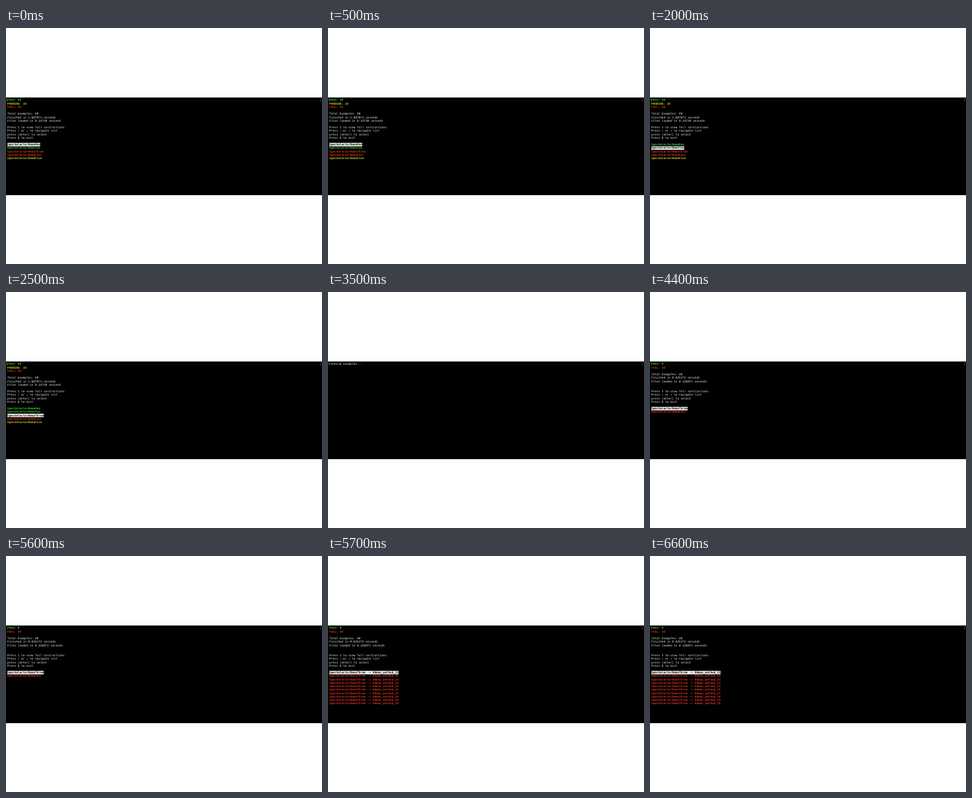
These frames come from a looping animation (480x360 px, 6.8 s). An HTML page:

```html
<!DOCTYPE html>
<html lang="en">
<head>
<meta charset="utf-8">
<title>Spec selector</title>
<style>
  html, body { margin: 0; width: 100%; height: 100%; overflow: hidden; background: #fff; }
  svg { display: block; width: 100vw; height: 100vh; }
  text {
    font-family: "DejaVu Sans Mono", monospace;
    font-size: 43.7px;
    text-rendering: geometricPrecision;
    fill: #f2f2f2;
  }
  .pass, .fail, .pending, .selected { font-weight: bold; }
  .pass { fill: #2fc92c; }
  .fail { fill: #cf3020; }
  .pending { fill: #c8c52b; }
  .italic { font-style: italic; }
  .selected { fill: #000; }
  .mark { fill: none; stroke: #777; stroke-width: 5; }
</style>
</head>
<body>
<svg viewBox="0 0 4800 3600">
  <rect y="1060" width="4800" height="1490"/>
  <path class="mark" id="leftMark" d="M24 1080H14V1118H24"/>
  <path class="mark" d="M4770 1080H4777V1118H4770"/>
  <g id="screen"></g>
</svg>
<script>
const LOOP = 6800;
const LEFT = 20, TOP = 1074, ROW = 52.2, CHAR = 26.3;
const screenNode = document.getElementById('screen');
const leftMark = document.getElementById('leftMark');

const line = (row, text, style = '') => ({ row, text, style });
const block = (row, texts, style) => texts.map((text, i) => line(row + i, text, style));

const help = block(8, [
  'Press I to view full instructions',
  'Press ↑ or ↓ to navigate list',
  'press [enter] to select',
  'Press Q to exit'
]);

const menu = (items, selected) => items.map(([text, style], i) =>
  line(13 + i, text, i === selected ? 'selected' : style));

const timing = (row, total, finished, loaded) => block(row, [
  `Total Examples: ${total}`,
  `Finished in ${finished} seconds`,
  `Files loaded in ${loaded} seconds`
], 'italic');

const group = (name, style) => [`SpecSelectorDemo${name}`, style];
const groups = [
  group('One', 'pass'), group('Two', 'pass'),
  group('Three', 'fail'), group('Four', 'fail'), group('Five', 'pending')
];
const methods = Array.from({ length: 10 }, (_, i) =>
  [`SpecSelectorDemoThree -> #demo_method_${21 + i}`, 'fail']);

const overview = selected => [
  line(0, 'PASS: 40', 'pass'),
  line(1, 'PENDING: 10', 'pending'),
  line(2, 'FAIL: 40', 'fail'),
  ...timing(4, 90, '1.807871', '0.33739'),
  ...help,
  ...menu(groups, selected)
];

const running = () => [line(0, 'running examples...', 'italic')];

const counts = failed => [
  line(0, 'PASS: 0', 'pass'),
  line(1, `FAIL: ${failed}`, 'fail')
];

const results = items => [
  ...counts(40),
  ...timing(3, 40, '0.825272', '0.326071'),
  ...help,
  ...menu(items, 0)
];

// The failure counter advances every 100 ms.
const counting = t => counts(Math.floor(38 + 4.85 * (Math.floor(t / 100) - 43)));

const steps = [
  [0, () => overview(0)],
  [2000, () => overview(1)],
  [2500, () => overview(2)],
  [2700, running],
  [3600, counting],
  [4400, () => results(groups.slice(2, 4))],
  [5700, () => results(methods)]
];

function add(tag, attributes, text = '') {
  const node = document.createElementNS(screenNode.namespaceURI, tag);
  for (const [name, value] of Object.entries(attributes)) node.setAttribute(name, value);
  node.textContent = text;
  screenNode.append(node);
}

function draw(lines) {
  screenNode.replaceChildren();
  for (const { row, text, style } of lines) {
    const y = TOP + row * ROW;
    if (style === 'selected') {
      add('rect', { x: LEFT, y, width: text.length * CHAR, height: ROW, fill: '#fff' });
    }
    add('text', { x: LEFT, y: y + 40, class: style }, text);
  }
}

let shown = -1;
function frame() {
  const t = performance.now() % LOOP;
  const tick = Math.floor(t / 100);
  if (tick !== shown) {
    shown = tick;
    const [, build] = steps.findLast(([start]) => t >= start);
    draw(build(t));
    leftMark.style.display = t < 4400 ? '' : 'none';
  }
  requestAnimationFrame(frame);
}
frame();
</script>
</body>
</html>
```
